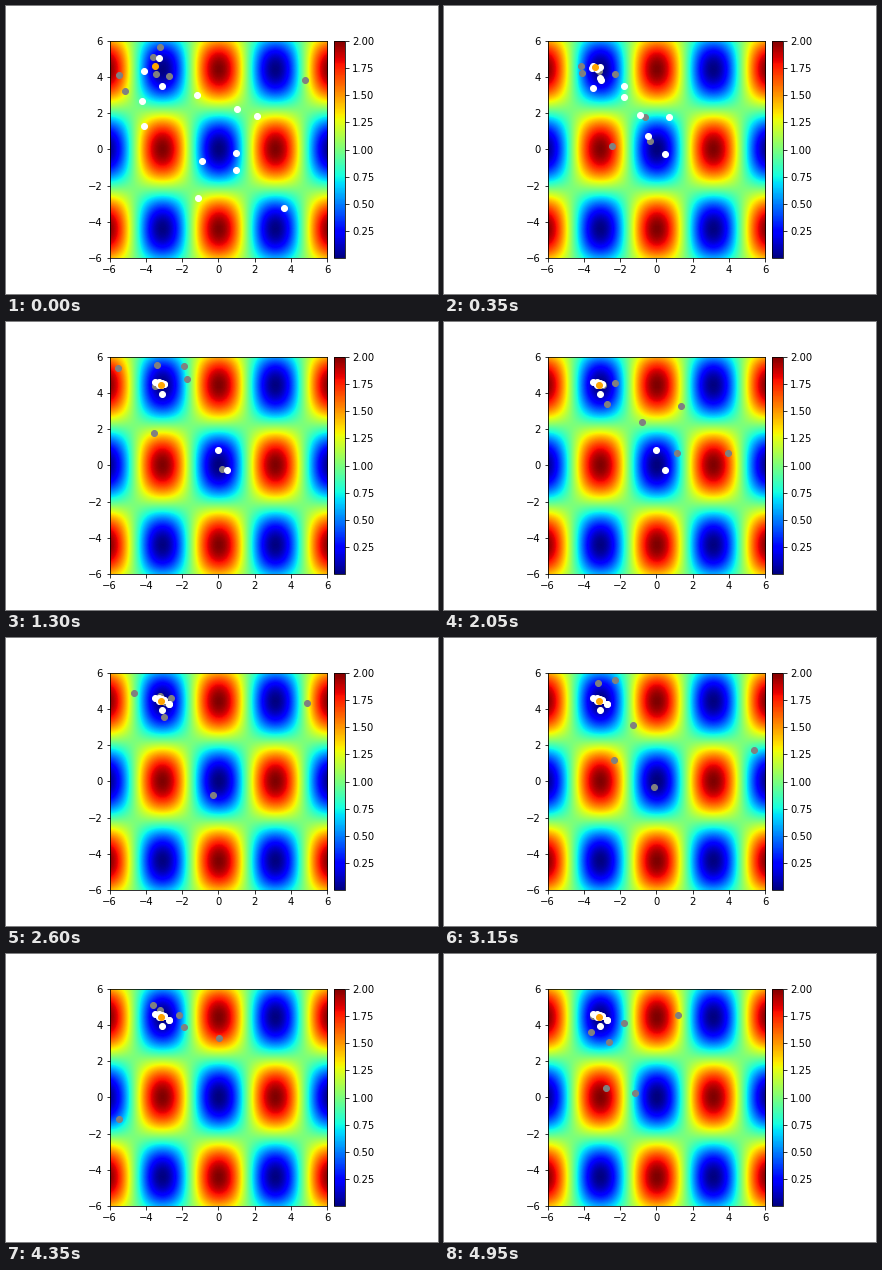
These frames come from a looping animation (432 px wide and 288 px high, 5000 ms). A matplotlib script:

```python
import numpy as np
import matplotlib.pyplot as plt
from matplotlib.animation import FuncAnimation
from mpl_toolkits.axes_grid1 import make_axes_locatable

FRAMES, INTERVAL = 100, 50
LIMIT = 6
HOPS = 3          # jumps a nest needs to reach its resting place
LEAVE_STOP = 50   # when nests give up the central valley

MINIMUM = np.array([np.pi * -1, np.pi * np.sqrt(2)])
BEST_START = np.array([-3.5, 4.6])
STARTS = np.array([
    (-3.25, 5.04), (-4.1, 4.32), (-3.1, 3.5), (-4.2, 2.67), (-4.1, 1.29),
    (-1.2, 3.0), (2.15, 1.84), (0.95, -0.2), (0.95, -1.14), (-1.1, -2.69),
    (3.6, -3.24), (1.05, 2.22), (-0.88, -0.65),
])
STOPS = np.array([(0, 0.83), (0.5, -0.28)])
# Outer resting places; the remaining nests end near the minimum
RESTS = np.array([(-3.5, 4.6), (-3.3, 4.6), (-3.0, 4.5), (-3.1, 3.95)])
LAST_REST = np.array([-2.75, 4.27])


def griewank(x, y):
    return 1 + (x**2 + y**2) / 4000 - np.cos(x) * np.cos(y / np.sqrt(2))


def hop(start, end, frame, duration):
    """Go from start to end in a few hard jumps."""
    done = min(frame * HOPS // duration, HOPS) / HOPS
    return start + (end - start) * done


def build_goals():
    rng = np.random.default_rng(4)
    count = len(STARTS) - len(RESTS) - len(STOPS)
    near = rng.normal(MINIMUM, 0.07, (count, 2))
    return np.vstack([RESTS, near, STOPS])


GOALS = build_goals()


def nests(frame):
    spots = np.array([hop(start, goal, frame, 6 + 3 * (i % 3))
                      for i, (start, goal) in enumerate(zip(STARTS, GOALS))])
    if frame >= LEAVE_STOP:
        spots[-len(STOPS):] = LAST_REST
    return spots


def best(frame):
    return hop(BEST_START, MINIMUM, frame, 12)


def trials(frame):
    """Fresh random tries: some close to the best, some far out."""
    rng = np.random.default_rng(frame)
    near = rng.normal(best(frame), 0.8, (rng.integers(2, 5), 2))
    far = rng.uniform((-5.5, -1.5), (5.5, 5), (rng.integers(2, 5), 2))
    return np.vstack([near, far])


plt.rcParams["font.family"] = "DejaVu Sans"
fig, ax = plt.subplots(figsize=(6, 4), dpi=72, facecolor="white")
fig.subplots_adjust(left=0.125, right=0.9, bottom=0.125, top=0.88)

grid = np.linspace(-LIMIT, LIMIT, 100)
image = ax.imshow(griewank(*np.meshgrid(grid, grid)), cmap="jet",
                  origin="lower", interpolation="bilinear",
                  extent=(-LIMIT, LIMIT, -LIMIT, LIMIT))
ax.set_xticks(range(-LIMIT, LIMIT + 1, 2))
ax.set_yticks(range(-LIMIT, LIMIT + 1, 2))
cax = make_axes_locatable(ax).append_axes("right", size="5%", pad=0.1)
fig.colorbar(image, cax=cax, ticks=np.arange(0.25, 2.01, 0.25), format="%.2f")


def dots(color, zorder):
    return ax.plot([], [], "o", color=color, markersize=6, zorder=zorder)[0]


trial_dots = dots("gray", 3)
nest_dots = dots("white", 4)
best_dot = dots("orange", 5)
ax.set(xlim=(-LIMIT, LIMIT), ylim=(-LIMIT, LIMIT))


def draw(frame):
    trial_dots.set_data(*trials(frame).T)
    nest_dots.set_data(*nests(frame).T)
    best_dot.set_data(*best(frame)[:, None])
    return trial_dots, nest_dots, best_dot


anim = FuncAnimation(fig, draw, frames=FRAMES, interval=INTERVAL,
                     repeat=True, repeat_delay=0)
plt.show()
```
